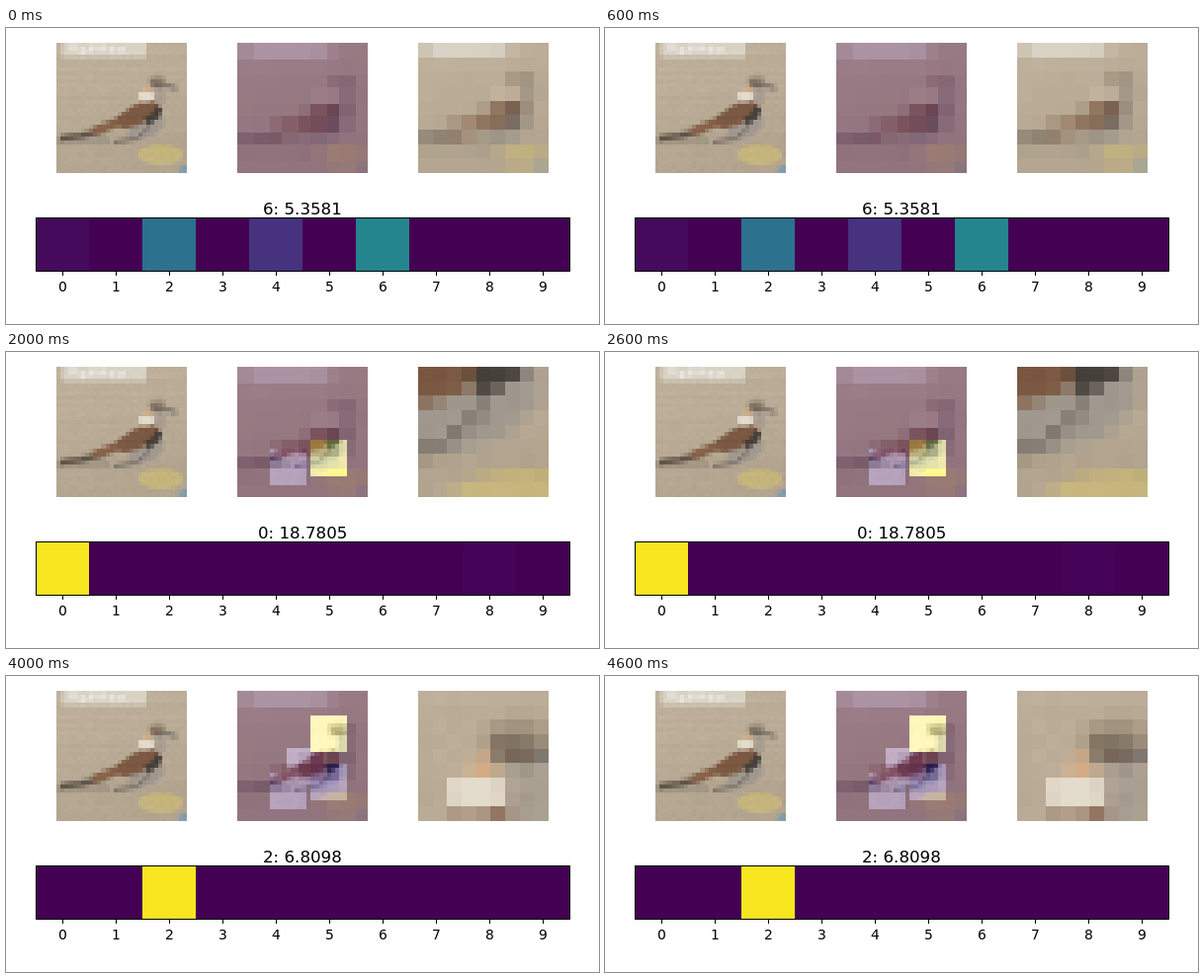
An HTML page with a canvas that plays this animation: 600 by 300 pixels, repeating every 5000 ms.

```html
<!DOCTYPE html>
<html lang="en">
<head>
<meta charset="utf-8">
<title>Glimpse classifier</title>
<style>
html, body { margin: 0; width: 100%; height: 100%; overflow: hidden; background: #fff; }
canvas { display: block; }
</style>
</head>
<body>
<canvas id="stage" width="600" height="300"></canvas>
<script>
const ctx = document.getElementById('stage').getContext('2d');
const N = 32, G = 9, SIZE = 132, TOP = 15, STEP = 1000;
const LOW = [68, 1, 84], HIGH = [253, 231, 37];

// Each step: title, glimpse corner (null = whole picture), lit classes
const steps = [
  { title: '6: 5.3581', at: null, bars: { 0: '#460a5d', 2: '#2c718e', 4: '#46327e', 6: '#25858e' } },
  { title: '0: 7.6777', at: [8, 20], bars: { 0: '#1f958b', 2: '#46085c', 8: '#25848e' } },
  { title: '0: 18.7805', at: [18, 18], bars: { 0: '#f8e621', 8: '#450457' } },
  { title: '2: 12.2933', at: [12, 14], bars: { 0: '#287a8e', 2: '#1fa187', 8: '#450457' } },
  { title: '2: 6.8098', at: [18, 6], bars: { 2: '#f8e621' } }
];

let seed = 7;
function rand() {
  seed = (seed * 16807) % 2147483647;
  return seed / 2147483647 - 0.5;
}

// A small bird on sandy ground, painted softly at 32 x 32
function paintBird() {
  const c = document.createElement('canvas');
  c.width = c.height = N;
  const g = c.getContext('2d', { willReadFrequently: true });
  const oval = (color, x, y, rx, ry = rx, turn = 0) => {
    g.fillStyle = color;
    g.beginPath();
    g.ellipse(x, y, rx, ry, turn, 0, Math.PI * 2);
    g.fill();
  };
  const line = (color, width, ...points) => {
    g.strokeStyle = color;
    g.lineWidth = width;
    g.beginPath();
    points.forEach(p => g.lineTo(...p));
    g.stroke();
  };

  const ground = g.createLinearGradient(6, 0, 14, N);
  ground.addColorStop(0, 'rgb(191,177,155)');
  ground.addColorStop(1, 'rgb(177,163,142)');
  g.fillStyle = ground;
  g.fillRect(0, 0, N, N);
  g.filter = 'blur(0.5px)';
  g.lineJoin = 'round';

  // pale strip, leaf, blue corner
  line('#d8d2c5', 4, [1.5, 1.5], [22, 1.5]);
  for (let i = 0; i < 6; i++) oval('#e8e5de', 4 + i * 2.4, 1.6 + rand(), 0.9);
  oval('#c4b47c', 25.5, 27.5, 5.5, 2.4);
  oval('#7f9aab', 31.5, 31.5, 1.6);

  // belly, legs, tail
  line('#a09685', 1.6, [0, 24], [13, 24]);
  oval('#a0988f', 22, 20.8, 4.8, 2.6, -0.5);
  line('#7f776e', 1, [23, 20.5], [19.5, 23.5], [14, 24.5]);
  line('#62564a', 1.4, [1, 23.5], [6, 22.8], [12, 21.4]);

  // wing and dark breast
  line('#866148', 2.2, [9, 21.8], [17, 18.8]);
  oval('#7b5841', 20, 17.6, 5.8, 2.4, -0.45);
  line('#46403b', 2, [25.3, 15.8], [24.3, 18], [22, 19.3]);

  // neck, crown, beak, cheek
  line('#a79d91', 2.4, [25.5, 10.5], [25.5, 15]);
  line('#a0917d', 1.2, [22.5, 9.2], [25, 8.3], [27, 9.5]);
  line('#766759', 1.8, [23.2, 9.8], [26.2, 10.4]);
  line('#7a736b', 1.1, [26, 10.3], [29.5, 11.3]);
  oval('#cf9f74', 22.4, 11.4, 0.9);
  oval('#e4dccd', 22, 13.1, 2.2, 1.4);

  const data = g.getImageData(0, 0, N, N).data;
  const img = [];
  for (let y = 0; y < N; y++) {
    const row = rand() * 4;
    img.push([]);
    for (let x = 0; x < N; x++) {
      const n = row + rand() * 4, i = (y * N + x) * 4;
      img[y].push([0, 1, 2].map(k => data[i + k] + n));
    }
  }
  return img;
}

// Area average down to 9 x 9
function shrink(img) {
  const out = [];
  for (let j = 0; j < G; j++) {
    out.push([]);
    for (let i = 0; i < G; i++) {
      const sum = [0, 0, 0];
      let count = 0;
      for (let y = Math.floor(j * N / G); y < Math.ceil((j + 1) * N / G); y++)
        for (let x = Math.floor(i * N / G); x < Math.ceil((i + 1) * N / G); x++) {
          img[y][x].forEach((v, k) => sum[k] += v);
          count++;
        }
      out[j].push(sum.map(v => v / count));
    }
  }
  return out;
}

const bird = paintBird();
const coarse = shrink(bird);

const inside = (at, x, y) =>
  at && x >= at[0] && x < at[0] + G && y >= at[1] && y < at[1] + G;

const clamp = v => Math.min(255, Math.max(0, v));
const add = (a, b) => a.map((v, k) => clamp((v + b[k]) * 1.22 - [203, 168, 118][k]));

// Coarse memory plus the glimpses so far, under a mask tint
function memory(n, x, y) {
  const now = inside(steps[n].at, x, y);
  const seen = now || steps.slice(0, n).some(s => inside(s.at, x, y));
  const rough = coarse[Math.floor(y * G / N)][Math.floor(x * G / N)];
  const base = seen ? add(bird[y][x], rough) : rough;
  const tint = now ? HIGH : LOW;
  return base.map((v, k) => v * 0.7 + tint[k] * 0.3);
}

function grid(left, count, pick) {
  const edge = i => Math.round(i * SIZE / count);
  for (let y = 0; y < count; y++)
    for (let x = 0; x < count; x++) {
      ctx.fillStyle = `rgb(${pick(x, y).map(Math.round).join(',')})`;
      ctx.fillRect(left + edge(x), TOP + edge(y), edge(x + 1) - edge(x), edge(y + 1) - edge(y));
    }
}

// Centred text that starts on a whole pixel
function label(text, x, y, size) {
  ctx.font = `${size}px "DejaVu Sans", sans-serif`;
  ctx.fillText(text, Math.round(x - ctx.measureText(text).width / 2), y);
}

function draw(n) {
  const { title, at, bars } = steps[n];
  ctx.fillStyle = '#fff';
  ctx.fillRect(0, 0, 600, 300);

  grid(51, N, (x, y) => bird[y][x]);
  grid(234, N, (x, y) => memory(n, x, y));
  grid(417, G, (x, y) => at ? bird[at[1] + y][at[0] + x] : coarse[y][x]);

  for (let i = 0; i < 10; i++) {
    ctx.fillStyle = bars[i] || '#440154';
    ctx.fillRect(30 + i * 54, 192, 54, 54);
  }
  ctx.strokeStyle = ctx.fillStyle = '#000';
  ctx.lineWidth = 1;
  ctx.strokeRect(30.5, 192.5, 540, 54);
  for (let i = 0; i < 10; i++) {
    ctx.fillRect(57 + i * 54, 247, 1, 4);
    label(i, 57 + i * 54, 267, 13.89);
  }
  label(title, 300, 189, 16.67);
}

let shown = -1;
const start = performance.now();
function tick() {
  const n = Math.floor((performance.now() - start) / STEP) % steps.length;
  if (n !== shown) draw(shown = n);
  requestAnimationFrame(tick);
}
tick();
</script>
</body>
</html>
```
